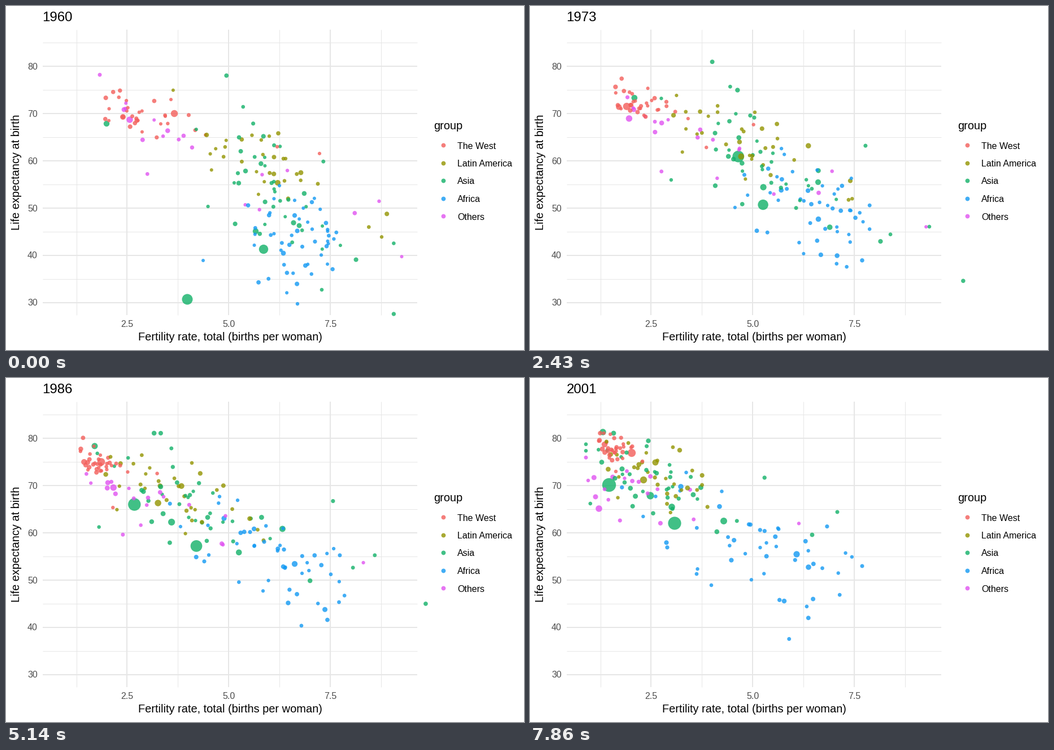
Recreate the animation shown at these times as a matplotlib script. Size 917 px wide and 611 px high, loop 8 s.

```python
import numpy as np
import matplotlib.pyplot as plt
from matplotlib.animation import FuncAnimation

W, H = 917, 611
PT = 0.72                      # points per pixel at 100 dpi
FRAMES, LOOP = 56, 8000
ALPHA = 0.8
YEARS = np.linspace(1960, 2001, FRAMES)
STOPS = [1960, 1973, 1987, 2001]
FINE = [1960, 1965, 1973, 1981, 1987, 1994, 2001]
ERAS = [1960, 1981, 2001]

COLORS = {
    "The West": "#f35e5a",
    "Latin America": "#929400",
    "Asia": "#12b168",
    "Africa": "#1299f3",
    "Others": "#e053f1",
}
WEST, LATIN, ASIA, AFRICA, OTHERS = COLORS

rng = np.random.default_rng(11)
big, small = [], []


def add(group, r0, r1, pts, years=STOPS, layer=big):
    """One dot moving through way points while its radius grows."""
    x, y = (np.interp(YEARS, years, pts[i::2]) for i in (0, 1))
    path = np.column_stack([x, y, np.linspace(r0, r1, FRAMES)])
    layer.append((COLORS[group], path))


def noise(n):
    z = rng.normal(size=n)
    return np.clip((z - z.mean()) / z.std(), -2.3, 2.3)


def add_crowd(group, n, skew, *eras):
    """Tilted cloud; each era is centre x, y, spread x, y and correlation."""
    cx, cy, sx, sy, corr = (np.interp(YEARS, ERAS, e)[:, None]
                            for e in zip(*eras))
    turn = np.interp(YEARS, [1960, 2001], [0, 0.9])[:, None]
    u, v = (np.cos(turn) * noise(n) + np.sin(turn) * noise(n)
            for _ in range(2))
    x = np.maximum(cx + sx * (u + skew * (u ** 2 - 1)), 99)
    y = np.maximum(cy + sy * (corr * u + np.sqrt(1 - corr ** 2) * v), 98)
    for i in range(n):
        r = (3 + 1.3 * rng.random() ** 2) * np.linspace(1, 1.06, FRAMES)
        small.append((COLORS[group], np.column_stack([x[:, i], y[:, i], r])))


# Large populations, drawn below the crowd
add(ASIA, 9.5, 12.2,
    [321, 521, 270, 510, 462, 409, 567, 354, 467, 322, 448, 278,
     359, 266, 229, 239, 227, 222, 165, 208, 140, 190],
    [1960, 1961, 1962, 1963, 1965, 1970, 1973, 1981, 1987, 1994, 2001])
add(ASIA, 8.2, 11.6, [456, 432, 450, 400, 411, 351, 365, 312,
                      332, 296, 290, 279, 256, 258], FINE)
add(WEST, 6.2, 7.2, [298, 191, 245, 187, 168, 178, 166, 155,
                     169, 148, 178, 142, 180, 133], FINE)
add(OTHERS, 5.7, 5.8, [219, 202, 185, 196, 175, 200, 169, 209,
                       194, 192, 135, 243, 122, 232], FINE)
add(ASIA, 5.2, 6.6, [442, 400, 438, 411, 412, 318, 344, 278,
                     284, 252, 233, 227, 213, 209], FINE)
add(LATIN, 5, 6.2, [481, 314, 371, 266, 262, 219, 201, 181])
add(ASIA, 5.2, 5.7, [178, 209, 185, 162, 155, 118, 129, 96])
add(ASIA, 4.6, 6, [509, 385, 510, 311, 488, 265, 343, 254])
add(ASIA, 4.4, 5.8, [519, 390, 531, 393, 404, 304, 251, 229])
add(WEST, 5, 5.2, [207, 197, 156, 179, 137, 147, 132, 118])
add(LATIN, 4.4, 5.5, [522, 296, 492, 247, 298, 188, 222, 150])
add(AFRICA, 4.4, 5.6, [491, 439, 511, 377, 511, 327, 472, 313])
add(OTHERS, 4.4, 4.5, [209, 184, 183, 184, 180, 186, 116, 211])
add(AFRICA, 4, 4.8, [530, 461, 544, 443, 566, 409, 493, 336])
add(AFRICA, 4.1, 4.8, [511, 372, 443, 326, 382, 244, 267, 193])

# Small dots far from their group
add(ASIA, 3.3, 3.5, [559, 504, 690, 341, 544, 238], ERAS, small)
add(AFRICA, 3.2, 3.5, [516, 529, 590, 420, 588, 334], ERAS, small)
add(AFRICA, 3, 3.3, [349, 452, 372, 296, 321, 368], ERAS, small)
add(WEST, 3.2, 3.2, [480, 250, 202, 252, 152, 166], ERAS, small)
add(WEST, 3.1, 3.3, [555, 262, 291, 177, 199, 148], ERAS, small)

add_crowd(WEST, 30, 0.2, (240, 193, 46, 21, 0.4),
          (170, 159, 24, 15, 0.5), (148, 123, 18, 18, 0))
add_crowd(LATIN, 31, 0.05, (463, 282, 84, 52, 0.8),
          (326, 214, 84, 42, 0.75), (225, 172, 54, 31, 0.55))
add_crowd(ASIA, 41, 0.1, (479, 324, 76, 78, 0.6),
          (385, 242, 128, 70, 0.7), (220, 180, 88, 46, 0.65))
add_crowd(AFRICA, 46, -0.05, (517, 413, 44, 46, -0.1),
          (500, 322, 72, 50, 0.6), (400, 304, 105, 66, 0.6))
add_crowd(OTHERS, 18, 0.2, (370, 270, 148, 78, 0.9),
          (305, 240, 122, 50, 0.85), (200, 200, 92, 42, 0.75))

dots = big + [small[i] for i in rng.permutation(len(small))]
colors = [c for c, _ in dots]
paths = np.stack([p for _, p in dots], axis=1)

plt.rcParams["font.family"] = "Liberation Sans"
fig = plt.figure(figsize=(W / 100, H / 100), dpi=100, facecolor="white")
ax = fig.add_axes([0, 0, 1, 1])
ax.set(xlim=(0, W), ylim=(H, 0))
ax.axis("off")


def px(fertility):
    return 34.65 + 71.9 * fertility


def py(age):
    return 778.2 - 8.39 * age


def area(radius):
    return (2 * radius * PT) ** 2


def label(x, y, text, size, color="black", **kw):
    return ax.text(x, y, text, fontsize=size * PT, color=color,
                   va="baseline", **kw)


def grid(xs, ys, width):
    style = dict(color="#e6e6e6", lw=width * PT, zorder=0)
    ax.vlines([px(v) for v in xs], 42, 548.5, **style)
    ax.hlines([py(v) for v in ys], 65, 728, **style)


grid((1.25, 3.75, 6.25, 8.75), range(35, 90, 10), 1)
grid((2.5, 5, 7.5), range(30, 90, 10), 1.95)
for v in (2.5, 5.0, 7.5):
    label(px(v), 570.5, f"{v:.1f}", 16, "#4d4d4d", ha="center")
for v in range(30, 90, 10):
    label(56, py(v) + 5.8, str(v), 16, "#4d4d4d", ha="right")

label(396.5, 593.5, "Fertility rate, total (births per woman)", 20,
      ha="center")
label(24.5, 295, "Life expectancy at birth", 20, ha="center",
      rotation=90, rotation_mode="anchor")
label(757.5, 219, "group", 20)
for i, (name, color) in enumerate(COLORS.items()):
    y = 247.5 + 31.5 * i
    ax.scatter(773.5, y - 0.5, s=area(3.9), c=color, alpha=ALPHA, lw=0)
    label(799, y + 6, name, 16)

title = label(64.5, 27, "", 24)
cloud = ax.scatter(paths[0, :, 0], paths[0, :, 1], s=area(paths[0, :, 2]),
                   c=colors, alpha=ALPHA, lw=0, zorder=2)


def draw(k):
    cloud.set_offsets(paths[k, :, :2])
    cloud.set_sizes(area(paths[k, :, 2]))
    title.set_text(str(round(YEARS[k])))
    return cloud, title


anim = FuncAnimation(fig, draw, frames=FRAMES, interval=LOOP / FRAMES,
                     repeat=True, repeat_delay=0)
plt.show()
```
